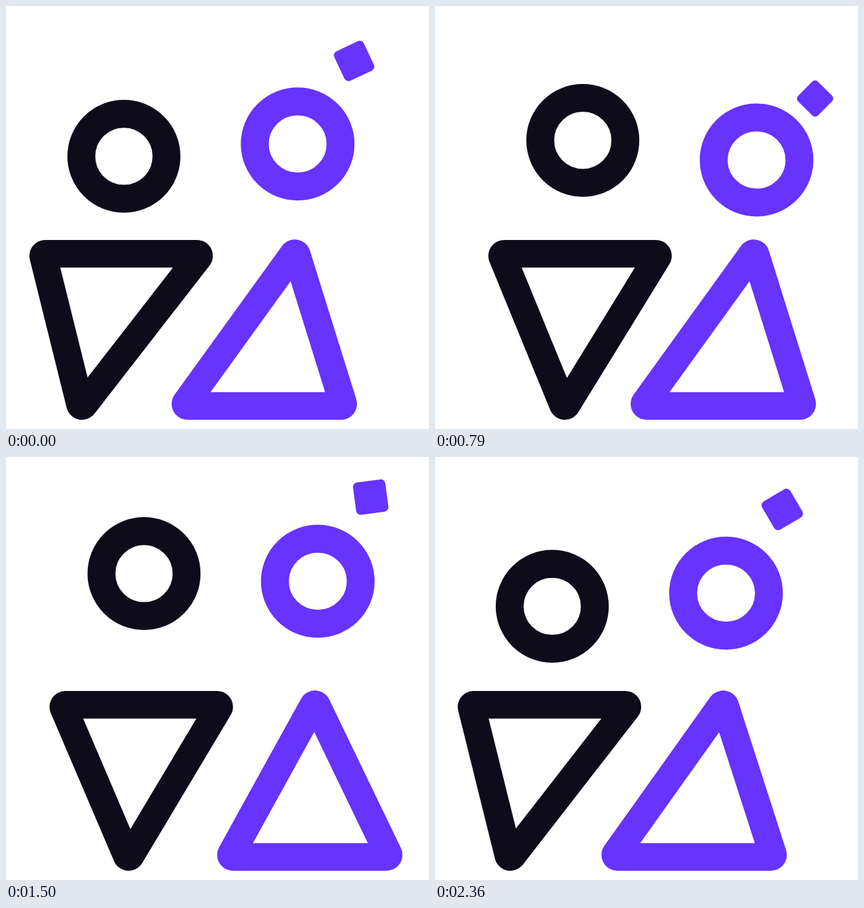
An HTML page that plays this animation: 640x640 px, repeating every 2.43 s.

```html
<!DOCTYPE html>
<html lang="en">
<head>
<meta charset="utf-8">
<title>Two swaying figures</title>
<style>
  html, body { margin: 0; width: 100%; height: 100%; overflow: hidden; background: #fff; }
  svg { display: block; width: 100vw; height: 100vh; }
  .dark { --ink: #0e0b1a; }
  .violet { --ink: #6633ff; }
  .ring { fill: none; stroke: var(--ink); stroke-width: 42.2; }
  .body { fill: var(--ink); stroke: var(--ink); stroke-width: 48; stroke-linejoin: round; }
  .hole { fill: #fff; }
  .chip { fill: var(--ink); }
</style>
</head>
<body>
<svg viewBox="0 0 640 640">
  <g class="dark">
    <polygon class="body" id="darkBody"/>
    <polygon class="hole" id="darkHole"/>
    <ellipse class="ring" id="darkRing" rx="64.4" ry="64.3"/>
  </g>
  <g class="violet">
    <polygon class="body" id="violetBody"/>
    <polygon class="hole" id="violetHole"/>
    <ellipse class="ring" id="violetRing" rx="64.9" ry="64.4"/>
    <rect class="chip" id="chip" x="-.5" y="-.5" width="1" height="1" rx=".14"/>
  </g>
</svg>
<script>
const LOOP = 2430;      // ms
const STEPS = 34;       // pictures per loop
const PERIOD = 33.5;    // sway period, in steps
const INSET = 17.8;     // body centre line to its hole
const HARMONICS = 3;
const KEYS = [0, 7, 11, 15, 21, 25, 33];

const $ = id => document.getElementById(id);

function basis(step) {
  const w = step * 2 * Math.PI / PERIOD;
  const out = [1];
  for (let k = 1; k <= HARMONICS; k++) out.push(Math.cos(k * w), Math.sin(k * w));
  return out;
}

// Gaussian elimination; the last column is the right-hand side
function solve(m) {
  const n = m.length;
  for (let i = 0; i < n; i++) {
    for (let r = 0; r < n; r++) {
      if (r === i) continue;
      const q = m[r][i] / m[i][i];
      for (let c = i; c <= n; c++) m[r][c] -= q * m[i][c];
    }
  }
  return m.map((row, i) => row[n] / row[i]);
}

// Smooth periodic curve through the key poses; high harmonics are damped
function wave(...poses) {
  const rows = KEYS.map(basis);
  const size = rows[0].length;
  const m = Array.from({ length: size }, (_, i) => {
    const line = Array.from({ length: size }, (_, j) =>
      rows.reduce((sum, b) => sum + b[i] * b[j], 0));
    const k = Math.ceil(i / 2);
    if (k > 1) line[i] += 0.0025 * k ** 4;
    line.push(rows.reduce((sum, b, n) => sum + b[i] * poses[n], 0));
    return line;
  });
  const weights = solve(m);
  return step => basis(step).reduce((sum, b, i) => sum + b * weights[i], 0);
}

const sway = wave(178.4, 206, 223.6, 231, 208.8, 189.4, 177.4);
const darkHead = wave(227.5, 221.8, 203.3, 184.7, 176.4, 189.4, 225.8);
const violetHead = wave(208.7, 236.4, 233, 217, 188, 180.2, 206);
const darkFoot = wave(115, 162, 196.4, 214.9, 185.5, 150.5, 114);
const violetFoot = wave(274.5, 290, 320, 345, 343.4, 321, 276);
const chipX = wave(526.4, 559.2, 575, 580, 551.8, 529.6, 525.7);
const chipY = wave(82.5, 137.5, 140, 114.5, 60.7, 41.4, 80);
const chipTurn = wave(-24.5, 30.5, 45, 28, -7.3, -54.3, -31);
const chipSize = wave(49.4, 43.8, 42.4, 43.9, 49.3, 51, 49.4);

function set(id, attrs) {
  for (const name in attrs) $(id).setAttribute(name, attrs[name]);
}

// The hole is the triangle shrunk towards its incentre
function drawBody(name, pts) {
  const [a, b, c] = pts;
  const dist = (p, q) => Math.hypot(p[0] - q[0], p[1] - q[1]);
  const sides = [dist(b, c), dist(c, a), dist(a, b)];
  const around = sides[0] + sides[1] + sides[2];
  const mid = [0, 1].map(k => pts.reduce((s, p, i) => s + p[k] * sides[i], 0) / around);
  const area2 = Math.abs((b[0] - a[0]) * (c[1] - a[1]) - (c[0] - a[0]) * (b[1] - a[1]));
  const scale = 1 - INSET * around / area2;
  const inner = pts.map(p => p.map((v, k) => mid[k] + (v - mid[k]) * scale));
  set(name + 'Body', { points: pts.join(' ') });
  set(name + 'Hole', { points: inner.join(' ') });
}

function draw(step) {
  const x = sway(step);
  const foot = violetFoot(step);
  drawBody('dark', [[x - 119, 378], [x + 110.6, 378], [darkFoot(step), 602]]);
  drawBody('violet', [[x + 258.6, 377.3], [foot + 232.4, 602], [foot, 602]]);
  set('darkRing', { cx: x, cy: darkHead(step) });
  set('violetRing', { cx: x + 262.9, cy: violetHead(step) });
  set('chip', {
    transform: `translate(${chipX(step)} ${chipY(step)}) rotate(${chipTurn(step)}) scale(${chipSize(step)})`
  });
}

const start = performance.now();
function tick() {
  const t = (performance.now() - start) % LOOP;
  // 6 ms absorbs the rounding of step times to 10 ms
  draw(Math.min(STEPS - 1, Math.floor((t + 6) / LOOP * STEPS)));
  requestAnimationFrame(tick);
}
tick();
</script>
</body>
</html>
```
